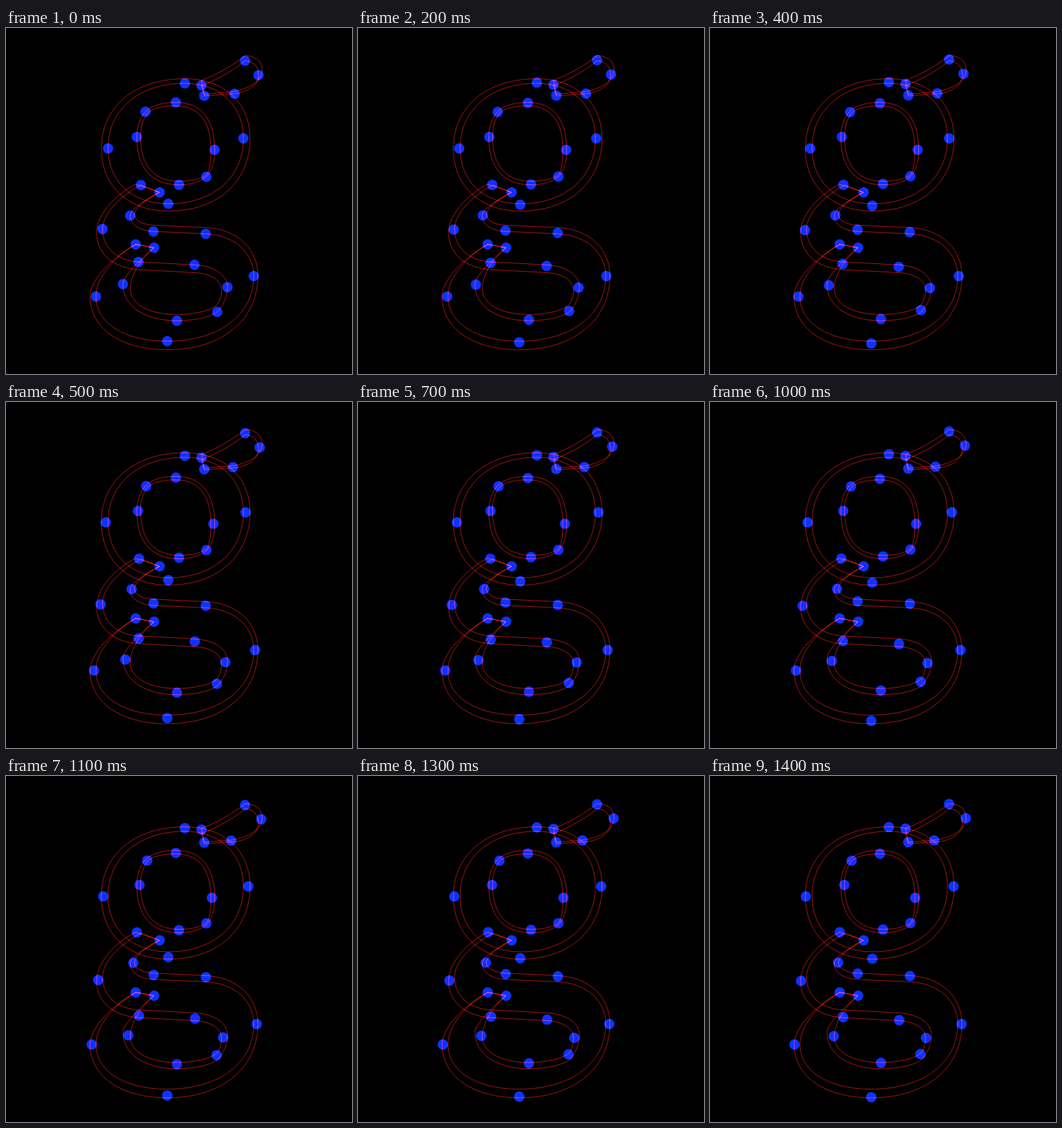
Write an HTML page with a canvas that moves like this. It is 500 px wide and 500 px high and loops after 1.5 s.

```html
<!DOCTYPE html>
<html lang="en">
<head>
<meta charset="utf-8">
<title>Letter interpolation</title>
<style>
  html, body { margin: 0; width: 100%; height: 100%; overflow: hidden; background: #000; }
  canvas { display: block; width: 100%; height: 100%; }
</style>
</head>
<body>
<canvas id="stage" width="500" height="500"></canvas>
<script>
const ctx = document.getElementById('stage').getContext('2d');
const STEP = 100, STEPS = 15, RADIUS = 7.5;

// Headings along the outline, in degrees.
const E = 0, S = 90, W = 180, N = -90;
const sin = deg => Math.sin(deg * Math.PI / 180);
const cos = deg => Math.cos(deg * Math.PI / 180);
const mix = (a, b, p) => a + (b - a) * p;

// Smooth nodes are pushed to the left of their heading; dx, dy add a drift.
const smooth = (x, y, heading, dx = 0, dy = 0) =>
  ({ x, y, dx, dy, in: heading, out: heading, push: 1 });
// Corner nodes only drift. A missing heading means a straight line on that side.
const corner = (x, y, inward, outward, dx = 0, dy = 0) =>
  ({ x, y, dx, dy, in: inward, out: outward, push: 0 });

// Gives every node its full move; tension sets how square the curves are.
function contour(weightX, weightY, tension, nodes) {
  for (const n of nodes) {
    if (!n.push) continue;
    n.dx += weightX * sin(n.in);
    n.dy -= weightY * cos(n.in);
  }
  return { tension, nodes };
}

const bowl = contour(9.7, 8.6, 0.6, [
  smooth(258.5, 80, E, 0, 2),
  smooth(343, 159.5, S),
  smooth(234.5, 254, W, 0, 2),
  smooth(147.5, 174, N)
]);
const counter = contour(5.4, 5.1, 0.65, [
  smooth(245.5, 107.5, W),
  corner(201.5, 121, 135, 130, 3.4, 1.6),
  smooth(189, 157.4, S),
  smooth(250, 226.6, E),
  corner(289.6, 215, -40, -45, 0, -2.7),
  smooth(301.5, 176, N)
]);
const ear = contour(5.1, 0, 0.6, [
  corner(282.5, 83, null, -19, 0, -7.5),
  corner(345.5, 47.5, -39, E, 0, -7.5),
  smooth(365, 68.2, S, 0, -7.7),
  corner(330.4, 95, 173, null, -6.9, -2.2),
  corner(286.5, 98, null, null, 0, -2.5)
]);
const loop = contour(8.5, 9, 0.6, [
  corner(195, 227, -28, null, -8, -1.3),
  corner(222, 237.5, null, 153),
  smooth(179.5, 271, S, -2.4, -1.4),
  smooth(213, 294, 3),
  smooth(288.5, 297.4, 3),
  smooth(358, 358.5, S, -2.5),
  smooth(233, 452.5, W, 0, 3.5),
  smooth(130, 388, N),
  corner(187.4, 312.7, -30, null),
  corner(214, 317.5, null, 140),
  smooth(169, 370, S, 2, 6.4),
  smooth(247, 423, E),
  corner(305.2, 410.2, -38, -43, -1.2, -9.1),
  smooth(320, 374.5, N, 0, 4.3),
  smooth(272.4, 342.3, 183, 1.5, 2.3),
  smooth(191.4, 338, 183, 1.5, 2.3),
  smooth(139.5, 290.5, N, 0, 5.9)
]);
const contours = [bowl, counter, ear, loop];

const place = (n, p) => ({ x: n.x + n.dx * p, y: n.y + n.dy * p });

// Curve towards the crossing of both tangents, or a line if there is none.
function connect(path, a, b, start, end, tension) {
  const turn = sin(end - start);
  if (start === null || end === null || Math.abs(turn) < 0.01) {
    path.lineTo(b.x, b.y);
    return;
  }
  const d = ((b.x - a.x) * sin(end) - (b.y - a.y) * cos(end)) / turn;
  const x = a.x + d * cos(start), y = a.y + d * sin(start);
  path.bezierCurveTo(
    mix(a.x, x, tension), mix(a.y, y, tension),
    mix(b.x, x, tension), mix(b.y, y, tension), b.x, b.y);
}

function addOutline(path, p) {
  for (const { tension, nodes } of contours) {
    const first = place(nodes[0], p);
    path.moveTo(first.x, first.y);
    nodes.forEach((node, i) => {
      const next = nodes[(i + 1) % nodes.length];
      connect(path, place(node, p), place(next, p), node.out, next.in, tension);
    });
    path.closePath();
  }
}

const outlines = new Path2D();
addOutline(outlines, 0);
addOutline(outlines, 1);

function draw(time) {
  const p = Math.floor(time / STEP) % STEPS / STEPS;

  ctx.globalCompositeOperation = 'source-over';
  ctx.fillStyle = '#000';
  ctx.fillRect(0, 0, 500, 500);

  ctx.fillStyle = '#1032ff';
  for (const node of contours.flatMap(c => c.nodes)) {
    const { x, y } = place(node, p);
    ctx.beginPath();
    ctx.arc(x, y, RADIUS, 0, Math.PI * 2);
    ctx.fill();
  }

  // Lines add their light to the dots beneath.
  ctx.globalCompositeOperation = 'lighter';
  ctx.strokeStyle = '#ff2014';
  ctx.lineWidth = 0.62;
  ctx.stroke(outlines);
}

const begin = performance.now();
function frame() {
  draw(performance.now() - begin);
  requestAnimationFrame(frame);
}
frame();
</script>
</body>
</html>
```
